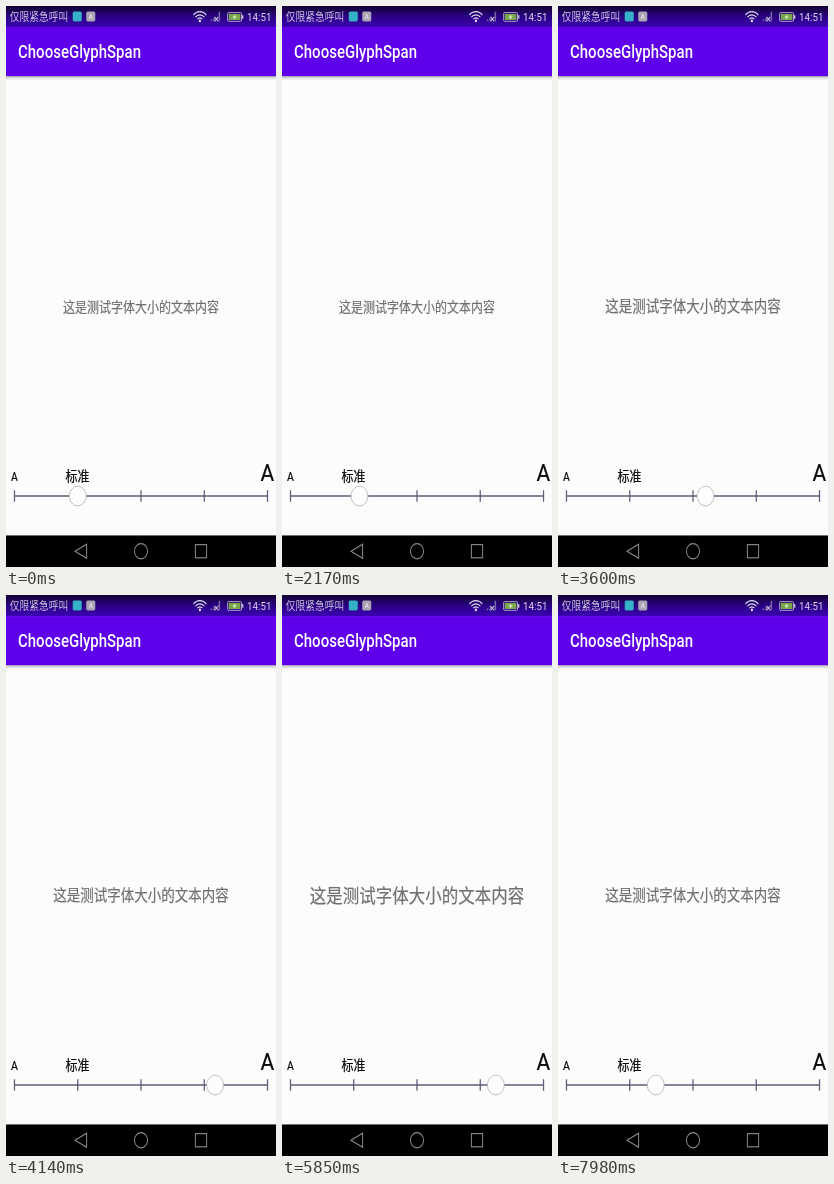
An HTML page for the animation above (8000 ms loop, 270 px wide and 561 px high).

```html
<!DOCTYPE html>
<html lang="zh-CN">
<head>
<meta charset="utf-8">
<title>ChooseGlyphSpan</title>
<style>
  html, body { margin: 0; width: 100%; height: 100%; overflow: hidden; background: #fcfcfc; }
  svg { display: block; width: 100vw; height: 100vh; }
  text { font-family: Roboto, "Noto Sans CJK SC", "Noto Sans CJK", sans-serif; }
  .mid { text-anchor: middle; }
  .icon { fill: none; stroke: #8c8c8c; stroke-width: 1.3; }
  .wifi { fill: none; stroke: #e6e1f4; stroke-width: 1.4; }
  #sample { fill: #707070; stroke: #707070; stroke-width: .25; }
  #labels { fill: #0a0a0a; stroke: #0a0a0a; stroke-width: .25; }
</style>
</head>
<body>
<!-- Units are dp: a 360 x 640 screen squeezed into the stage -->
<svg viewBox="0 0 360 640" preserveAspectRatio="none">
  <defs>
    <linearGradient id="status" x2="0" y2="1">
      <stop offset="0" stop-color="#10002e"/>
      <stop offset=".45" stop-color="#28007c"/>
      <stop offset="1" stop-color="#3c00b4"/>
    </linearGradient>
    <linearGradient id="shade" x2="0" y2="1">
      <stop offset="0" stop-opacity=".34"/>
      <stop offset=".4" stop-opacity=".12"/>
      <stop offset="1" stop-opacity="0"/>
    </linearGradient>
  </defs>

  <rect width="360" height="640" fill="#fcfcfc"/>
  <rect y="80" width="360" height="5" fill="url(#shade)"/>
  <rect y="24" width="360" height="56" fill="#5e00ea"/>
  <rect width="360" height="24" fill="url(#status)"/>

  <g font-size="13" fill="#cfc8e2">
    <text x="5" y="17.3">仅限紧急呼叫</text>
    <text x="321.5" y="17.3" fill="#e0daf0">14:51</text>
  </g>
  <rect x="89" y="6.300" width="12" height="11.500" rx="2" fill="#35b2c6"/>
  <rect x="107" y="6.300" width="12" height="11.500" rx="2" fill="#aaa4b4"/>
  <text class="mid" x="113" y="15" font-size="8.500" fill="#f4f2f8">A</text>

  <g class="wifi" id="wifi"><circle cx="258.500" cy="17" r=".8"/></g>
  <path d="M273 15.500h2v2h-2zM276.500 13.500h2v4h-2zM283.500 6.500h2v11h-2z" fill="#766aa8"/>
  <path d="M278 12.500l5 5m0-5l-5 5" stroke="#d8d2ea" stroke-width="1.200"/>
  <rect x="295.500" y="7.500" width="18.500" height="10" rx="1.500" fill="none" stroke="#c8c2d6"/>
  <rect x="314.500" y="10.500" width="2" height="4" fill="#c8c2d6"/>
  <rect x="297" y="9" width="15.500" height="7" fill="#79a94b"/>
  <path d="M306 9l-4 4h2.600l-1 3 4-4h-2.600z" fill="#e6efd6"/>

  <text x="16" y="59.300" font-size="20" font-weight="500" fill="#fff">ChooseGlyphSpan</text>
  <text id="sample" class="mid" x="180">这是测试字体大小的文本内容</text>

  <g class="mid" id="labels">
    <text x="11.300" y="542" font-size="14">A</text>
    <text x="95.300" y="542.200" font-size="16">标准</text>
    <text x="348.500" y="542" font-size="28">A</text>
  </g>
  <path id="scale" fill="none" stroke="#625d78" stroke-width="1.700"/>
  <g id="thumb">
    <circle cy="559.500" r="12" opacity=".06"/>
    <circle cy="559" r="11.200" fill="#fdfdfd" stroke="#b4b4b4" stroke-width=".9"/>
  </g>

  <rect y="604" width="360" height="36"/>
  <path class="icon" d="M92 622L107.500 614V630Z"/>
  <circle class="icon" cx="180" cy="622" r="8.700"/>
  <rect class="icon" x="252.500" y="614.500" width="15" height="15"/>
</svg>
<script>
const LOOP = 8000, LEFT = 11.3, STEP = 84.35;
const $ = id => document.getElementById(id);
const stopX = stop => LEFT + stop * STEP;

// Each drag starts where the one before ended; a whole stop means it was released there
const drags = [
  { start: 2000, end: 2780, to: 2 },
  { start: 3380, end: 4160, to: 3.34 },
  { start: 4280, end: 4870, to: 4 },
  { start: 5240, end: 5950, to: 3 },
  { start: 6540, end: 7110, to: 2 },
  { start: 7580, end: 8150, to: 1 }
];

// Grab with a small jump, wait, move steadily, snap at the end
const dragEase = u => u >= 1 ? 1 : Math.max(0.09, 1.05 * u - 0.15);

function pose(t) {
  let stop = 1, released = 1;
  for (const { start, end, to } of drags) {
    if (t < start) break;
    stop += (to - stop) * dragEase((t - start) / (end - start));
    if (t >= end && Number.isInteger(to)) released = to;
  }
  return { stop, size: 14 + 2 * released };
}

function draw(t) {
  const { stop, size } = pose(t);
  $("thumb").setAttribute("transform", `translate(${stopX(stop)})`);
  $("sample").setAttribute("font-size", size);
  $("sample").setAttribute("y", 342.6 + 0.38 * size);
}

let ticks = `M${stopX(0)} 559H${stopX(4)}`;
for (let i = 0; i <= 4; i++) ticks += `M${stopX(i)} 552.5v13`;
$("scale").setAttribute("d", ticks);

for (const r of [4.5, 8, 11.5]) {
  const arc = document.createElementNS("http://www.w3.org/2000/svg", "path");
  const w = r * 0.75;
  arc.setAttribute("d", `M${258.5 - w} ${18 - r * 0.66}a${r} ${r} 0 0 1 ${2 * w} 0`);
  $("wifi").append(arc);
}

const start = performance.now();
function tick() {
  draw((performance.now() - start) % LOOP);
  requestAnimationFrame(tick);
}
tick();
</script>
</body>
</html>
```
